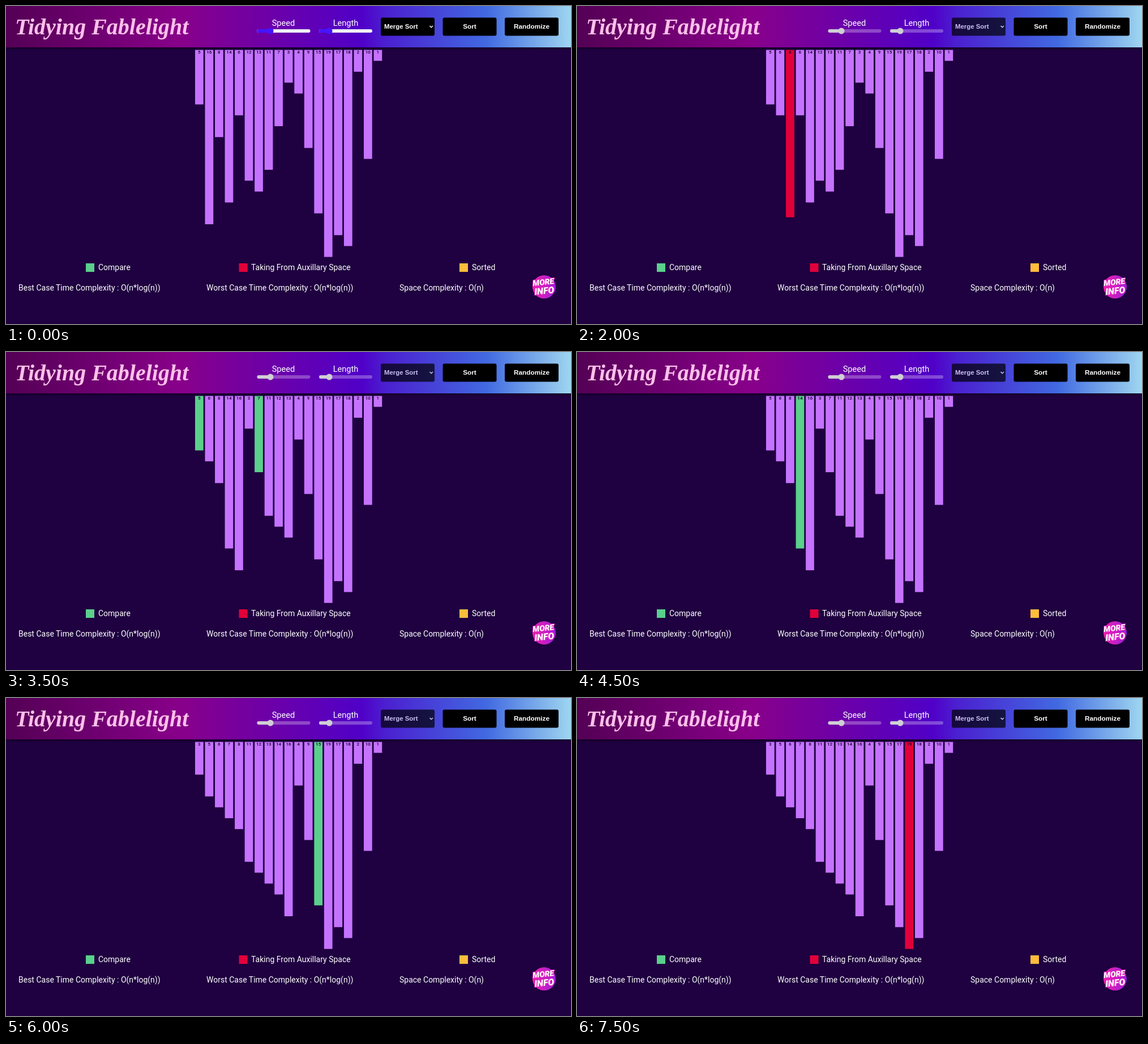
These frames come from a looping animation (998x561 px, 8 s). An HTML page:

```html
<!DOCTYPE html>
<html lang="en">
<head>
<meta charset="utf-8">
<title>Merge sort</title>
<style>
  html, body { margin: 0; width: 100%; height: 100%; overflow: hidden; background: #1f0040; }
  svg { display: block; width: 998px; height: 561px; font: 14px Roboto, sans-serif; fill: #fff; }
  .mid { text-anchor: middle; }
  .title { font: italic bold 40px "Liberation Serif", serif; fill: #ffc0ea; }
  .label { font-size: 14.6px; }
  .button { font: bold 11.8px "Liberation Sans", sans-serif; }
  .value { font-size: 8px; font-weight: 500; fill: #16002c; }
  .badge { font-weight: 900; font-style: italic; stroke: #e21fc0; stroke-width: 2px; paint-order: stroke; }
</style>
</head>
<body>
<svg viewBox="0 0 998 561">
  <defs>
    <linearGradient id="sky">
      <stop offset="0" stop-color="#540055"/>
      <stop offset=".31" stop-color="#88008a"/>
      <stop offset=".63" stop-color="#5000c8"/>
      <stop offset=".67" stop-color="#4b1fd0"/>
      <stop offset=".85" stop-color="#4169e1"/>
      <stop offset="1" stop-color="#9fd6f0"/>
    </linearGradient>
    <linearGradient id="pink">
      <stop offset="0" stop-color="#f41fa8"/>
      <stop offset="1" stop-color="#9a1fe0"/>
    </linearGradient>
  </defs>

  <rect width="998" height="73" fill="url(#sky)" style="filter:drop-shadow(0 1px 2px #000b)"/>
  <text class="title" x="16" y="50">Tidying Fablelight</text>
  <text class="label mid" x="490" y="34.5">Speed</text>
  <text class="label mid" x="600" y="34.5">Length</text>
  <g id="sliders"></g>

  <g id="select">
    <rect x="662" y="20.5" width="95" height="32" rx="3" fill="#000"/>
    <text class="button" x="668" y="40" style="font-size:11.4px">Merge Sort</text>
    <path d="M748.5 35l2.7 2.7 2.7-2.7" fill="none" stroke="#fff" stroke-width="1.5"/>
  </g>
  <rect x="771.5" y="20.5" width="95" height="32" rx="3" fill="#000"/>
  <text class="button mid" x="819" y="40">Sort</text>
  <rect x="881" y="20.5" width="95" height="32" rx="3" fill="#000"/>
  <text class="button mid" x="928.5" y="40">Randomize</text>

  <g id="bars"></g>

  <rect x="141" y="454" width="15" height="15" fill="#5bd08c"/>
  <text x="163" y="466">Compare</text>
  <rect x="411.5" y="454" width="15" height="15" fill="#e2003a"/>
  <text x="433" y="466">Taking From Auxillary Space</text>
  <rect x="801" y="454" width="15" height="15" fill="#ffbd3c"/>
  <text x="823" y="466">Sorted</text>
  <text x="22" y="502">Best Case Time Complexity : O(n*log(n))</text>
  <text x="354" y="502">Worst Case Time Complexity : O(n*log(n))</text>
  <text x="695" y="502">Space Complexity : O(n)</text>

  <circle cx="950.5" cy="495.5" r="20.5" fill="url(#pink)"/>
  <g class="badge mid" transform="rotate(-6 950 496)">
    <text x="950" y="492" font-size="14">MORE</text>
    <text x="950" y="508" font-size="16">INFO</text>
  </g>
</svg>

<script>
const LILAC = '#c573ff', GREEN = '#5bd08c', RED = '#e2003a';
const LOOP = 8000, TICK = 500, UNIT = 19.22, TOP = 77.5;
const values = [5, 16, 8, 14, 6, 12, 13, 11, 7, 3, 4, 9, 15, 19, 17, 18, 2, 10, 1];
const $ = id => document.getElementById(id);

// Every comparison and every write-back of the merge sort is one step.
const steps = [];
function record(color, hot, old) {
  steps.push({ color, hot, old, values: [...values] });
}
function mergeSort(left, right) {
  if (left >= right) return;
  const mid = (left + right) >> 1;
  mergeSort(left, mid);
  mergeSort(mid + 1, right);
  const merged = [];
  let i = left, j = mid + 1;
  while (i <= mid || j <= right) {
    record(GREEN, [i <= mid ? i : -1, j <= right ? j : -1]);
    const takeLeft = j > right || (i <= mid && values[i] <= values[j]);
    merged.push(values[takeLeft ? i++ : j++]);
  }
  merged.forEach((value, k) => {
    const old = values[left + k];
    values[left + k] = value;
    record(RED, [left + k], old);
  });
}
const idle = { hot: [], values: [...values] };
mergeSort(0, values.length - 1);

// Sort progress at each tick; the fraction is the time spent within the step.
const progress = [-1, 7.5, 14.5, 17.5, 21.04, 30.5, 40.5, 49.5,
  52.5, 56.5, 62.5, 68.5, 74.5, 76.5, 79.5, 81.5];

function slider(x, knob, active) {
  const [track, fill] = active ? ['#f0f0f4', '#4614ff'] : ['#ffffff48', '#cfcfd4'];
  return `<rect x="${x}" y="41" width="94" height="6" rx="3" fill="${track}"/>
    <rect x="${x}" y="41" width="${knob - x}" height="6" rx="3" fill="${fill}"/>
    <circle cx="${knob}" cy="44" r="5.5" fill="${fill}"/>`;
}

function bar(step, grow, value, i) {
  const x = 334 + i * 17.53;
  const hot = step.hot.includes(i);
  const from = hot && step.old ? step.old : value;
  const height = UNIT * (from + (value - from) * grow);
  return `<rect x="${x}" y="${TOP}" width="14.7" height="${height}" fill="${hot ? step.color : LILAC}"/>
    <text class="value mid" x="${x + 7.3}" y="84.3">${value}</text>`;
}

let shown = -1;
function draw(now) {
  const tick = Math.floor((now % LOOP) / TICK);
  if (tick !== shown) {
    shown = tick;
    const at = progress[tick], active = at < 0;
    const step = active ? idle : steps[Math.floor(at)];
    const grow = Math.min(1, (at - Math.floor(at)) * 2);
    $('sliders').innerHTML = slider(443.5, 467, active) + slider(553, 571, active);
    $('select').setAttribute('opacity', active ? 1 : 0.7);
    $('bars').innerHTML = step.values.map((v, i) => bar(step, grow, v, i)).join('');
  }
  requestAnimationFrame(draw);
}
draw(0);
</script>
</body>
</html>
```
